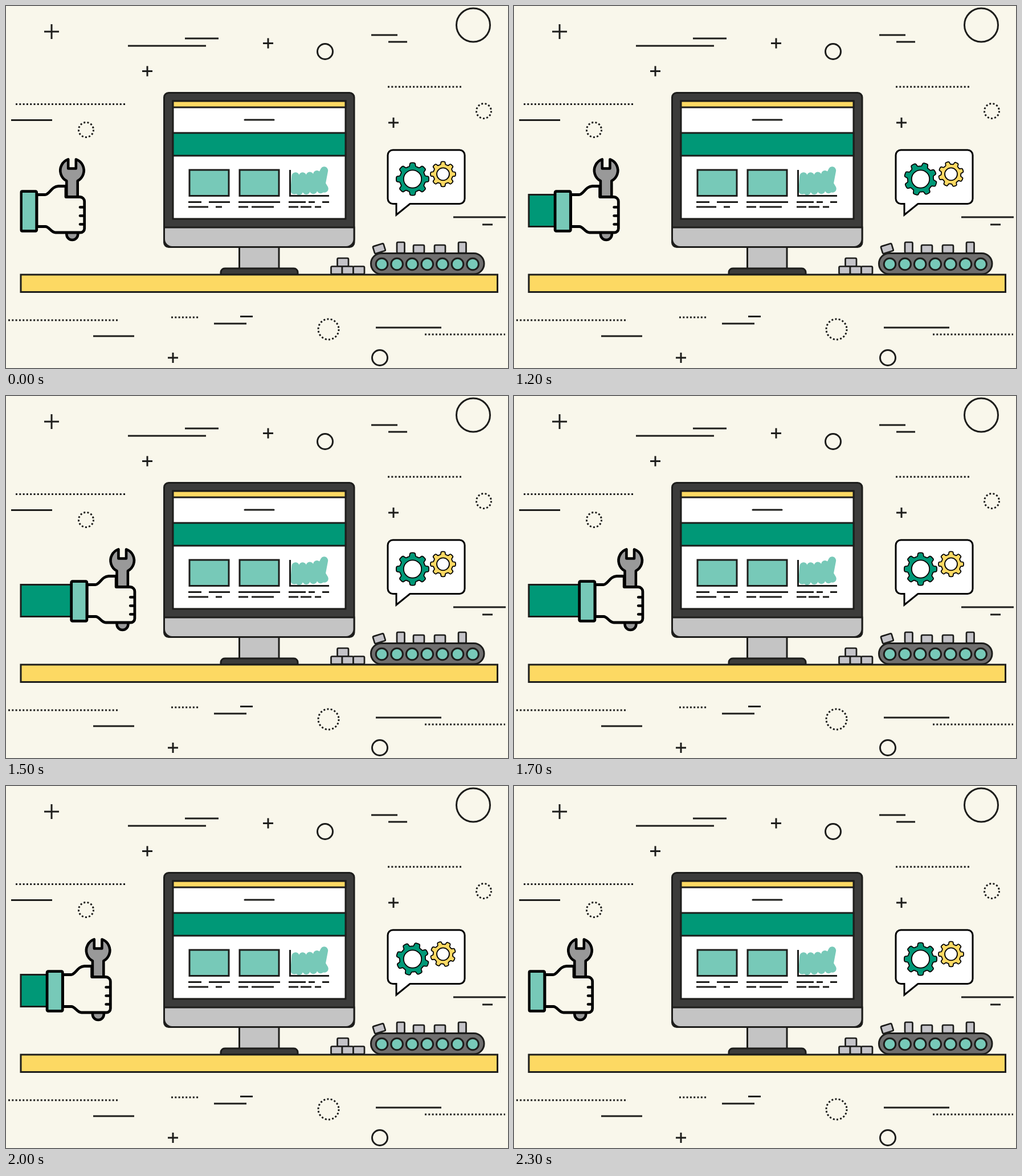
These frames come from a looping animation (881 by 636 pixels, 2.4 s). An HTML page with a canvas:

```html
<!DOCTYPE html>
<html lang="en">
<head>
<meta charset="utf-8">
<title>Workshop</title>
<style>
html, body { margin: 0; width: 100%; height: 100%; overflow: hidden; background: #f9f7eb; }
canvas { display: block; }
</style>
</head>
<body>
<canvas id="stage" width="881" height="636"></canvas>
<script>
const ctx = document.getElementById('stage').getContext('2d');
const INK = '#1d1d1b', BLACK = '#000', CREAM = '#f9f7eb', GREEN = '#009877', TEAL = '#77c9b8',
      YELLOW = '#fdd963', GREY = '#c4c4c4', STEEL = '#999', DARK = '#3c3c3b', WHITE = '#fff';
const DOT = 3, DOT_PITCH = 6.3;

function paint(fill, width = 3, ink = INK) {
  if (fill) { ctx.fillStyle = fill; ctx.fill(); }
  ctx.strokeStyle = ink;
  ctx.lineWidth = width;
  ctx.stroke();
}

// Rectangle given by its edges
function box(x1, y1, x2, y2, fill, radius = 0, width = 3, ink = INK) {
  ctx.beginPath();
  ctx.roundRect(x1, y1, x2 - x1, y2 - y1, radius);
  paint(fill, width, ink);
}

function circle(x, y, r, fill, width = 3, ink = INK) {
  ctx.beginPath();
  ctx.arc(x, y, r, 0, Math.PI * 2);
  paint(fill, width, ink);
}

function line(x, y, length, dash = []) {
  ctx.setLineDash(dash);
  ctx.beginPath();
  ctx.moveTo(x, y);
  ctx.lineTo(x + length, y);
  paint();
  ctx.setLineDash([]);
}

function dots(x, y, length) {
  line(x, y, length, [DOT, DOT_PITCH - DOT]);
}

function dotRing(x, y, r) {
  const girth = Math.PI * 2 * r;
  const pitch = girth / Math.round(girth / DOT_PITCH);
  ctx.setLineDash([DOT, pitch - DOT]);
  circle(x, y, r);
  ctx.setLineDash([]);
}

function plus(x, y, arm = 9) {
  line(x - arm, y, arm * 2);
  ctx.beginPath();
  ctx.moveTo(x, y - arm);
  ctx.lineTo(x, y + arm);
  paint();
}

function background() {
  ctx.fillStyle = CREAM;
  ctx.fillRect(0, 0, 881, 636);

  plus(80, 45, 13);
  plus(460, 65.5);
  plus(248, 114.5);
  plus(680, 205);
  plus(293, 618);

  circle(820, 33.5, 29.5);
  circle(560, 80, 13.5);
  circle(656, 618, 13.5);
  dotRing(140.5, 217.5, 13);
  dotRing(838.5, 184.5, 13);
  dotRing(566, 568, 18);

  line(314, 57, 59);
  line(214, 70, 137);
  line(641, 51, 46);
  line(671, 63, 33);
  line(9, 200.5, 72);
  line(785, 371, 92);
  line(836, 384, 18);
  line(153, 580, 72);
  line(365, 558, 57);
  line(411, 545.5, 22);
  line(649, 565, 115);

  dots(17, 172.5, 194);
  dots(670, 142, 129);
  dots(4, 552, 194);
  dots(290, 547, 48);
  dots(735, 577, 141);
}

function monitor() {
  box(277.5, 152.5, 611, 423.5, DARK, 8);
  box(277.5, 389, 611, 423.5, GREY, [0, 0, 14, 14]);
  box(409.5, 423.5, 479, 463, GREY);
  box(377, 461, 512, 472, DARK, [7, 7, 0, 0]);
  box(293, 167, 596, 374, WHITE);
  box(293, 167, 596, 178, YELLOW);
  box(293, 223, 596, 263, GREEN);
  ctx.lineCap = 'round';
  line(419, 200, 51);
  ctx.lineCap = 'butt';
  card(0, [23, 13, 37], [35, 13, 11]);
  card(1, [73], [17, 6, 39]);
  card(2, [30, 5, 11, 13, 12], [17, 4, 19, 6, 11]);
}

// Each row of words alternates run and gap lengths
function card(index, ...rows) {
  const x = 322 + index * 88;
  if (index < 2) {
    box(x, 288, x + 69, 333.5, TEAL);
  } else {
    scribble();
    ctx.beginPath();
    ctx.moveTo(x + 0.5, 288);
    ctx.lineTo(x + 0.5, 333.5);
    ctx.lineTo(x + 69, 333.5);
    paint();
  }
  rows.forEach((runs, i) => {
    const length = runs.reduce((sum, run) => sum + run);
    line(x - 2, 344.5 + i * 8.5, length, [...runs, 100]);
  });
}

function scribble() {
  ctx.lineJoin = ctx.lineCap = 'round';
  ctx.beginPath();
  ctx.moveTo(506, 324);
  for (let i = 0; i <= 8; i++) {
    ctx.lineTo(508 + i * 6.3, i % 2 ? 326 - i * 0.5 : 299 - 10 * (i / 8) ** 4);
  }
  ctx.lineTo(550, 306);
  ctx.lineTo(559, 321);
  paint(null, 13.5, TEAL);
  ctx.lineJoin = 'miter';
  ctx.lineCap = 'butt';
}

function block(x, bottom, w, h, tilt = 0) {
  ctx.save();
  ctx.translate(x, bottom);
  ctx.rotate(tilt);
  box(0, -h, w, 0, '#c4c3c8', 2, 2.7);
  ctx.restore();
}

function conveyor() {
  box(640.5, 434.5, 839, 471, '#706f6f', 18);
  for (let i = 0; i < 7; i++) circle(659.5 + i * 26.6, 453.5, 10.3, TEAL);
  block(647.5, 435.5, 19.5, 13.4, -0.3);
  block(686, 434, 13.5, 19);
  block(715, 434, 19, 14);
  block(752, 434, 19, 14);
  block(794, 434, 13.5, 19);
  block(581.5, 457.5, 19.5, 14.5);
  for (let i = 0; i < 3; i++) block(570.5 + i * 19.5, 471, 19.5, 13.5);
}

function gear(x, y, radius, tooth, hole, fill, turn) {
  const teeth = 8, samples = 240;
  ctx.beginPath();
  for (let i = 0; i < samples; i++) {
    const a = i / samples * Math.PI * 2;
    const r = radius + tooth * Math.tanh(3 * Math.cos(teeth * a));
    ctx.lineTo(x + r * Math.cos(a + turn), y + r * Math.sin(a + turn));
  }
  ctx.closePath();
  paint(fill, 1.8, BLACK);
  circle(x, y, hole, WHITE, 1.8, BLACK);
}

function bubble(turn) {
  ctx.beginPath();
  ctx.moveTo(685, 347.5);
  ctx.lineTo(679, 347.5);
  ctx.arcTo(670, 347.5, 670, 338, 9);
  ctx.arcTo(670, 253, 680, 253, 9);
  ctx.arcTo(805, 253, 805, 263, 9);
  ctx.arcTo(805, 347.5, 795, 347.5, 9);
  ctx.lineTo(709, 347.5);
  ctx.lineTo(685, 367);
  ctx.closePath();
  paint(WHITE, 3, BLACK);
  gear(713.5, 304, 25.6, 3, 15.7, GREEN, turn);
  gear(767, 295.3, 19.6, 2.4, 11, YELLOW, -turn);
}

function wrench() {
  const x = 116, y = 289, r = 20.7, slot = 6.8, neck = 9.7;
  const mouth = Math.asin(slot / r), throat = Math.asin(neck / r);
  box(x - neck, 385, x + neck + 0.5, 411, STEEL, [0, 0, 10, 10], 4.6, BLACK);
  ctx.beginPath();
  ctx.moveTo(x - neck, 336);
  ctx.arc(x, y, r, Math.PI / 2 + throat, Math.PI * 1.5 - mouth);
  ctx.lineTo(x - slot, 285.5);
  ctx.lineTo(x + slot, 285.5);
  ctx.arc(x, y, r, mouth - Math.PI / 2, Math.PI / 2 - throat);
  ctx.lineTo(x + neck, 336);
  ctx.closePath();
  paint(STEEL, 4.6, BLACK);
}

function hand() {
  ctx.lineJoin = 'round';
  wrench();
  ctx.beginPath();
  ctx.moveTo(54, 331.5);
  ctx.lineTo(69, 331.5);
  ctx.bezierCurveTo(77, 330, 80, 317, 92, 316.5);
  ctx.lineTo(105, 316.5);
  ctx.lineTo(105, 335.5);
  ctx.arcTo(137.7, 335.5, 137.7, 344, 8);
  ctx.arcTo(137.7, 398, 130, 398, 7);
  ctx.lineTo(87, 398);
  ctx.bezierCurveTo(79, 398, 76, 387.5, 69, 387.5);
  ctx.lineTo(54, 387.5);
  ctx.closePath();
  paint(CREAM, 4.8, BLACK);
  ctx.lineCap = 'round';
  for (let i = 0; i < 3; i++) {
    ctx.beginPath();
    ctx.moveTo(130, 353.5 + i * 15);
    ctx.lineTo(137, 353.5 + i * 15);
    paint(null, 4.6, BLACK);
  }
  ctx.lineCap = 'butt';
  box(26.5, 325.7, 53.7, 395.3, TEAL, 2, 4.8, BLACK);
  ctx.lineJoin = 'miter';
}

function arm(reach) {
  if (reach) box(26, 331.5, 40 + reach, 387.5, GREEN);
  ctx.save();
  ctx.beginPath();
  ctx.rect(24.5, 200, 300, 240);
  ctx.clip();
  ctx.translate(reach, 0);
  hand();
  ctx.restore();
}

const LOOP = 2400, HOLD = 1000, STEP = 100, STEPS = 14;

function draw(time) {
  const step = Math.max(0, Math.floor((time % LOOP - HOLD) / STEP) + 1);
  const out = Math.min(step, STEPS - step);
  background();
  monitor();
  conveyor();
  box(26, 472, 862.5, 502.5, YELLOW);
  bubble(step % 2 * Math.PI / 10);
  arm(out && 3 + out * 14.2);
}

const start = performance.now();
function tick() {
  draw(performance.now() - start);
  requestAnimationFrame(tick);
}
tick();
</script>
</body>
</html>
```
